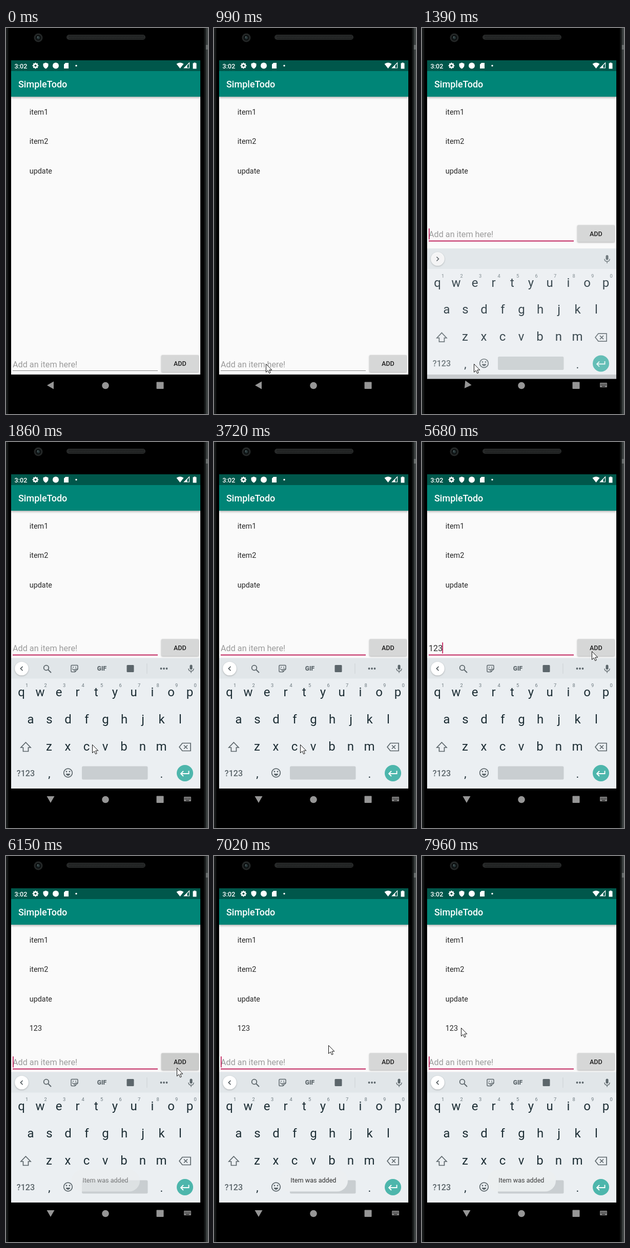
Recreate the animation shown at these times as an HTML page with a canvas. Size 394 px wide and 753 px high, loop 8000 ms.

```html
<!DOCTYPE html>
<html lang="en">
<head>
<meta charset="utf-8">
<title>Todo list</title>
<style>
html, body { margin: 0; width: 100%; height: 100%; overflow: hidden; background: #000; }
canvas { display: block; }
</style>
</head>
<body>
<canvas id="stage" width="394" height="753"></canvas>
<script>
const ctx = document.getElementById('stage').getContext('2d');
const LOOP = 8000, STEP = 78.4;
const ACCENT = '#c2255f', KEY = '#1c2d34', ICON = '#5c666b';

// Each key is [time, ...values].
function track(keys, t) {
  if (t <= keys[0][0]) return keys[0].slice(1);
  for (let i = 1; i < keys.length; i++) {
    const a = keys[i - 1], b = keys[i];
    if (t < b[0]) {
      const u = (t - a[0]) / (b[0] - a[0]);
      return a.slice(1).map((v, j) => v + (b[j + 1] - v) * u);
    }
  }
  return keys[keys.length - 1].slice(1);
}

const POINTER = [
  [200, 386, 471], [440, 262, 560], [600, 150, 648], [680, 110, 668], [760, 95, 664],
  [905, 95, 664], [984, 101, 655], [1400, 101, 655], [1540, 128, 636], [1690, 164, 606],
  [1768, 167, 594], [1846, 168, 590], [5060, 168, 590], [5139, 180, 575], [5300, 255, 485],
  [5500, 341, 418], [5680, 331, 408], [5766, 331, 408], [5990, 333, 413], [6310, 333, 413],
  [6620, 257, 393], [7020, 223, 369], [7100, 223, 369], [7410, 170, 359], [7490, 170, 359],
  [7950, 76, 335]
];
const KEYBOARD = [[1220, 0], [1298, 0.45], [1376, 0.85], [1455, 1]];
const BACK_TURN = [[1220, 0], [1376, 0.6], [1533, 1]];
const TOOLS = [[1530, 0], [1690, 1]];
const TOAST = [[6020, 0], [6158, 0.6], [6300, 1], [7880, 1], [8000, 0.9]];
const CARET_FLIPS = [1230, 1700, 2170, 2710, 3180, 3720, 4190, 5120, 5600, 6540, 7020, 7410, 7960];

function rect(x, y, w, h, fill) {
  ctx.fillStyle = fill;
  ctx.fillRect(x, y, w, h);
}

function round(x, y, w, h, r, fill) {
  ctx.beginPath();
  ctx.roundRect(x, y, w, h, r);
  ctx.fillStyle = fill;
  ctx.fill();
}

function disc(x, y, r, fill) {
  ctx.beginPath();
  ctx.arc(x, y, r, 0, Math.PI * 2);
  ctx.fillStyle = fill;
  ctx.fill();
}

function ring(x, y, r, color, width) {
  ctx.beginPath();
  ctx.arc(x, y, r, 0, Math.PI * 2);
  ctx.strokeStyle = color;
  ctx.lineWidth = width;
  ctx.stroke();
}

function shape(x, y, d, fill, stroke, width = 1.6) {
  const path = new Path2D(d);
  ctx.save();
  ctx.translate(x, y);
  if (fill) { ctx.fillStyle = fill; ctx.fill(path); }
  if (stroke) { ctx.strokeStyle = stroke; ctx.lineWidth = width; ctx.stroke(path); }
  ctx.restore();
}

function text(s, x, y, size, color, weight = 400, align = 'left') {
  ctx.font = `${weight} ${size}px Roboto, sans-serif`;
  ctx.textAlign = align;
  ctx.fillStyle = color;
  ctx.fillText(s, x, y);
}

function withShadow(color, blur, dy, draw) {
  ctx.save();
  ctx.shadowColor = color;
  ctx.shadowBlur = blur;
  ctx.shadowOffsetY = dy;
  draw();
  ctx.restore();
}

function drawPhone() {
  rect(0, 0, 394, 753, '#000');
  rect(0, 0, 3, 753, '#191c1c');
  rect(3, 0, 2, 753, '#0d0f0f');
  rect(386, 0, 3, 753, '#121515');
  rect(389, 0, 2, 753, '#2a2e2e');
  rect(391, 0, 3, 753, '#404545');
  rect(390, 33, 4, 9, '#686d6d');
  round(118, 13, 154, 10, 5, '#272929');
  ctx.fillStyle = '#151717';
  for (let x = 123; x < 268; x += 3) {
    ctx.fillRect(x, 15, 1.4, 2);
    ctx.fillRect(x + 1, 19, 1.4, 2);
  }
  disc(63, 19, 8.5, '#242727');
  disc(63, 19, 5.5, '#0c0f10');
  disc(63, 19, 3, '#263436');
  disc(62, 17.5, 1, '#72807f');
}

function drawStatusBar() {
  rect(10, 63, 369, 21, '#00574b');
  text('3:02', 16.5, 78.5, 12.6, '#fff', 500);
  ring(57.5, 73.5, 3.4, '#fff', 2.6);
  for (let i = 0; i < 8; i++) {
    const a = i * Math.PI / 4;
    disc(57.5 + 4.8 * Math.cos(a), 73.5 + 4.8 * Math.sin(a), 1.2, '#fff');
  }
  shape(77.5, 73.5, 'M0-6L5-4V0Q4 4 0 6Q-4 4-5 0V-4Z', '#fff');
  disc(97, 73.5, 6, '#fff');
  shape(117.5, 73.5, 'M-1.5-5.5H4.5V5.5H-4.5V-2.5Z', '#fff');
  disc(137, 73.5, 1.7, '#fff');
  shape(339.5, 73, 'M0 6L-7-3Q0-8 7-3Z', '#fff');
  shape(352.5, 73, 'M5-5V5H-5Z', null, '#fff', 1.2);
  shape(352.5, 73, 'M1-1V5H-5Z', '#fff');
  shape(368, 73.5, 'M-1.5-6H1.5V-5H3.5V6H-3.5V-5H-1.5Z', '#fff');
}

function drawNav(turn, keyboard) {
  const grey = '#969696';
  ctx.save();
  ctx.translate(87, 697);
  ctx.rotate(-turn * Math.PI / 2);
  shape(0, 0, 'M-7 0L6-7.5V7.5Z', grey);
  ctx.restore();
  disc(194, 697.5, 6.8, grey);
  round(293.5, 690.5, 14, 13.5, 1, grey);
  if (keyboard) {
    round(347, 692, 14, 9, 1, '#858585');
    for (let i = 0; i < 5; i++) {
      rect(348.5 + i * 2.5, 694, 1.2, 1.2, '#000');
      rect(348.5 + i * 2.5, 696.3, 1.2, 1.2, '#000');
    }
    rect(351, 698.7, 6, 1, '#000');
  }
}

function drawInput(y, focused, typed, caret, pressed) {
  if (typed) text(typed, 13, y + 24, 16.2, '#303030');
  else text('Add an item here!', 13, y + 24, 16.2, '#9b9b9b');
  if (focused) rect(13, y + 30.5, 283, 2, ACCENT);
  else rect(13, y + 30.5, 283, 1, '#858585');
  if (caret) {
    const w = typed ? ctx.measureText(typed).width : 0;
    ctx.font = '400 16.2px Roboto, sans-serif';
    rect(13 + w - (typed ? 1 : 0), y + 7, 1.8, 21.5, ACCENT);
  }
  withShadow('rgba(0,0,0,.3)', 3, 1, () =>
    round(303, y + 0.5, 73, 33, 2, pressed ? '#cbcccb' : '#d6d7d7'));
  text('ADD', 339.3, y + 21.5, 12.6, '#202020', 500, 'center');
}

function drawToolbar(open) {
  rect(10, 421.5, 369, 40, '#e1e6e9');
  withShadow('rgba(0,0,0,.25)', 3, 1, () => disc(30.5, 442, 13.3, '#fff'));
  shape(30.5, 442, open > 0.5 ? 'M2-4L-2 0L2 4' : 'M-2-4L2 0L-2 4', null, '#424b50');
  round(358.5, 434.5, 5, 9.5, 2.5, ICON);
  shape(361, 442, 'M-5 0Q-5 5 0 5Q5 5 5 0M0 5V8.5', null, ICON, 1.4);
  if (!open) return;
  ctx.save();
  ctx.globalAlpha *= open;
  ring(78.5, 440.5, 4.8, ICON, 1.8);
  shape(82, 444, 'M0 0L6 6', null, ICON, 2);
  shape(133.5, 442, 'M-5-6.5H5Q6.5-6.5 6.5-5V1L1 6.5H-5Q-6.5 6.5-6.5 5V-5Q-6.5-6.5-5-6.5M6.5 1H2Q1 1 1 2V6.5M-4 0Q-2 4 0 2', null, ICON, 1.5);
  disc(-2.5 + 133.5, 439.5, 1, ICON);
  disc(2.5 + 133.5, 439.5, 1, ICON);
  text('GIF', 187, 446.3, 12, ICON, 900, 'center');
  round(235.5, 435, 14, 14, 1.5, ICON);
  rect(274.5, 432, 1, 20, '#cbd0d3');
  [302.5, 308, 313.5].forEach(x => disc(x, 442, 1.9, ICON));
  ctx.restore();
}

function drawKeyRow(letters, x, y) {
  [...letters].forEach((c, i) => text(c, x + i * 36.5, y, 24, KEY, 400, 'center'));
}

function drawKeyboard(show, open) {
  if (!show) return;
  ctx.save();
  ctx.globalAlpha = show;
  ctx.translate(0, 57 * (1 - show));
  rect(10, 421.5, 369, 254.5, '#ebeff2');
  drawToolbar(open);
  drawKeyRow('qwertyuiop', 30, 496);
  drawKeyRow('asdfghjkl', 48, 548.5);
  drawKeyRow('zxcvbnm', 84, 601.5);
  [...'1234567890'].forEach((c, i) => text(c, 40.5 + i * 36.5, 478, 9.3, '#6a777d', 400, 'center'));
  shape(38.5, 595, 'M0-9L9.5 1H5V8.5H-5V1H-9.5Z', null, ICON, 1.7);
  shape(349, 595, 'M-11 0L-5-7.5H11V7.5H-5ZM-2-3.5L5 3.5M5-3.5L-2 3.5', null, ICON, 1.7);
  text('?123', 38.5, 651.5, 16.2, ICON, 500, 'center');
  text(',', 84.5, 654, 22, KEY, 400, 'center');
  ring(121, 645.5, 8.3, ICON, 1.7);
  disc(118, 643, 1.4, ICON);
  disc(124, 643, 1.4, ICON);
  shape(121, 647, 'M-4.5 0H4.5Q3 4 0 4Q-3 4-4.5 0Z', ICON);
  round(148, 632.5, 128.5, 26, 2.5, '#c9ced1');
  text('.', 303.5, 655, 22, KEY, 400, 'center');
  disc(349, 646, 16, '#4db6ac');
  shape(349, 646, 'M7.5-4.5V1H-7M-3-4L-8 1L-3 6', null, '#fff', 1.9);
  ctx.restore();
}

function drawToast(alpha) {
  if (!alpha) return;
  ctx.save();
  ctx.globalAlpha = alpha;
  round(127.5, 612, 133.5, 42.5, 21, '#eceff1');
  text('Item was added', 149.3, 637, 12.6, '#303030');
  ctx.restore();
}

function drawPointer(x, y) {
  shape(x + 0.5, y + 0.5, 'M0 0V16L3.7 12.6L6.2 18.2L8.7 17.1L6.3 11.6H11.3Z', '#fff', '#111', 1);
}

function render(t) {
  // Movement is held between evenly spaced steps.
  const held = Math.max(0, 200 + STEP * Math.floor((t - 180) / STEP));
  const focused = t >= 1220;
  const added = t >= 5990;
  let typed = '';
  if (!added) typed = t >= 4570 ? '123' : t >= 4350 ? '12' : t >= 4190 ? '1' : '';
  const caret = CARET_FLIPS.filter(f => t >= f).length % 2 === 1;
  const [show] = track(KEYBOARD, held);

  drawPhone();
  rect(10, 63, 369, 613, '#fafafa');
  withShadow('rgba(0,0,0,.3)', 4, 1.5, () => rect(10, 84, 369, 50, '#008577'));
  drawStatusBar();
  text('SimpleTodo', 24, 116.3, 18, '#fff', 500);
  const items = ['item1', 'item2', 'update'];
  if (added) items.push('123');
  items.forEach((s, i) => text(s, 45.7, 168.5 + i * 57.5, 14.4, '#282828'));
  drawInput(focused ? 384 : 637.5, focused, typed, caret, t >= 5900 && t < 6380);

  ctx.save();
  ctx.beginPath();
  ctx.rect(10, 63, 369, 690);
  ctx.clip();
  drawKeyboard(show, track(TOOLS, held)[0]);
  ctx.restore();
  drawNav(track(BACK_TURN, held)[0], focused);
  drawToast(track(TOAST, held)[0]);
  if (t >= 200) drawPointer(...track(POINTER, held).map(Math.round));
}

const start = performance.now();
function frame() {
  render((performance.now() - start) % LOOP);
  requestAnimationFrame(frame);
}
frame();
</script>
</body>
</html>
```
